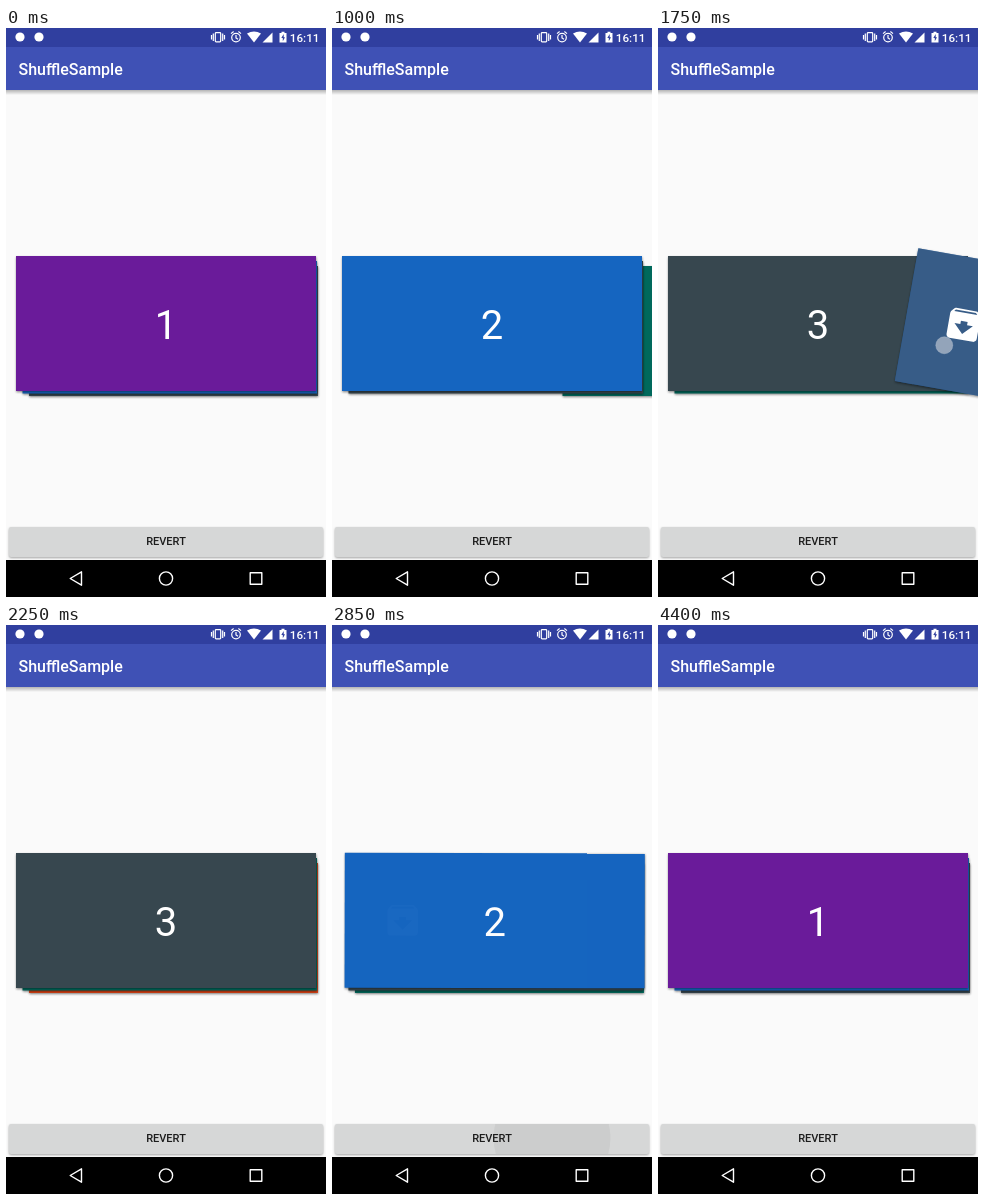
Recreate the animation shown at these times as an HTML page. Size 320x569 px, loop 4550 ms.

```html
<!DOCTYPE html>
<html lang="en">
<head>
<meta charset="utf-8">
<title>Card shuffle</title>
<style>
  html, body { margin: 0; width: 100%; height: 100%; overflow: hidden; background: #fafafa; }
  svg { display: block; width: 100%; height: 100%; }
  text { font-family: Roboto, "Open Sans", sans-serif; fill: #fff; }
  .medium { font-weight: 500; }
</style>
</head>
<body>
<svg viewBox="0 0 320 569" xmlns="http://www.w3.org/2000/svg">
  <defs>
    <linearGradient id="barShadow" x2="0" y2="1">
      <stop stop-color="#000" stop-opacity=".28"/>
      <stop offset="1" stop-color="#000" stop-opacity="0"/>
    </linearGradient>
    <filter id="soft" x="-5%" y="-10%" width="110%" height="120%">
      <feGaussianBlur stdDeviation="1.1"/>
    </filter>
    <clipPath id="buttonClip"><rect x="3" y="499" width="314" height="30" rx="2"/></clipPath>
  </defs>

  <rect width="320" height="569" fill="#fafafa"/>
  <g id="cards"></g>

  <rect y="62" width="320" height="5" fill="url(#barShadow)"/>
  <rect width="320" height="62" fill="#3f51b5"/>
  <rect width="320" height="19" fill="#303f9f"/>
  <text class="medium" x="12.5" y="46.5" font-size="16">ShuffleSample</text>

  <g fill="#fff">
    <circle cx="14" cy="9" r="4.6"/>
    <circle cx="33" cy="9" r="4.6"/>
    <path d="M241 5.5Q248 1.5 255 5.5L248 14.5Z"/>
    <path d="M256.500 14.500H266.500V4.500Z"/>
    <path d="M273.500 5H275.500V3.700H278.500V5H280.500V14.500H273.500Z"/>
    <path d="M277.700 6L275.300 10H276.800V13.300L279 9.200H277.700Z" fill="#303f9f"/>
  </g>
  <g fill="none" stroke="#fff" stroke-width="1.2">
    <rect x="209.300" y="4.600" width="5.400" height="9.200" rx=".8"/>
    <path d="M207.300 5.500V13M216.700 5.500V13M205.500 7V11.500M218.500 7V11.500"/>
    <circle cx="230" cy="9.600" r="4.300"/>
    <path d="M230 7V10L232 11.200M225 5.600L227.600 3.500M235 5.600L232.400 3.500"/>
  </g>
  <text class="medium" x="313.500" y="13.800" font-size="11.700" text-anchor="end">16:11</text>

  <rect x="3" y="500" width="314" height="30" rx="2" fill="#000" opacity=".35" filter="url(#soft)"/>
  <rect x="3" y="499" width="314" height="30" rx="2" fill="#d6d7d7"/>
  <g clip-path="url(#buttonClip)"><circle id="ripple" cx="220" cy="513"/></g>
  <text class="medium" x="160" y="517.200" font-size="11" text-anchor="middle" style="fill:#1c1c1c">REVERT</text>

  <rect y="532" width="320" height="37"/>
  <g fill="none" stroke="#fff" stroke-width="1.400" stroke-linejoin="round">
    <path d="M75.500 543.800V557.200L64.200 550.500Z"/>
    <circle cx="160" cy="550.500" r="6.600"/>
    <rect x="244.200" y="544.700" width="11.600" height="11.600"/>
  </g>
  <circle id="pointer" r="8.500" fill="#d0d4dc" stroke="#fff" stroke-opacity=".4"/>
</svg>

<script>
const LOOP = 4550;
const COLORS = ['#6a1b9a', '#1565c0', '#37474f', '#00695c', '#d84315'];
const EXIT = 340;         // distance that takes a card off stage
const SHIFT = 200;        // drag distance after which the stack has moved up
const SWIPES = [          // one per card that leaves and comes back
  { start: 350, end: 850, back: 3640, tap: 3550, settled: 4400 },
  { start: 1500, end: 1900, back: 2568, tap: 2450, settled: 3400 }
];
const ENTRIES = { 3: [890, 3640], 4: [1940, 2568] };  // card: [enters, removed]
const MOVE = 300;
const ARCHIVE = 'M20.54 5.23l-1.39-1.68C18.88 3.21 18.47 3 18 3H6c-.47 0-.88.21-1.16.55L3.46 5.23' +
  'C3.17 5.57 3 6.02 3 6.5V19c0 1.1.9 2 2 2h14c1.1 0 2-.9 2-2V6.5c0-.48-.17-.93-.46-1.27z' +
  'M12 17.5L6.5 12H10v-2h4v2h3.5zM5.12 5l.81-1h12l.94 1z';

const $ = id => document.getElementById(id);
const clamp = v => Math.min(1, Math.max(0, v));
const ease = (t, from, to) => (1 - Math.cos(Math.PI * clamp((t - from) / (to - from)))) / 2;
const set = (el, attrs) => { for (const k in attrs) el.setAttribute(k, attrs[k]); };

const box = 'x="-150" y="-67.5" width="300" height="135"';
$('cards').innerHTML = COLORS.map((color, i) => `
  <g>
    <rect ${box} transform="translate(.3 1.2)" opacity=".45" filter="url(#soft)"/>
    <rect ${box} fill="${color}"/>
    <text y="15.500" font-size="40" text-anchor="middle">${i + 1}</text>
    <g class="overlay">
      <rect ${box} fill="#555" fill-opacity=".53"/>
      <path d="${ARCHIVE}" fill="#fff" fill-rule="evenodd" transform="translate(-92 0) scale(1.7) translate(-12 -12)"/>
    </g>
  </g>`).reverse().join('');
const cards = [...$('cards').children].reverse();

function drawCard(el, i, t, offsets, shift) {
  const [enter, removed] = ENTRIES[i] || [0, LOOP];
  const away = offsets[i] || 0;
  const visible = t >= enter && t < removed && away < EXIT;
  set(el, { visibility: visible ? 'visible' : 'hidden' });
  if (!visible) return;
  const level = Math.max(0, i - shift);
  const slide = enter ? 297 * (1 - ease(t, enter, enter + MOVE)) : 0;
  const dy = away && t < SWIPES[i].back ? away * .073 : 0;
  const x = 160 + 3.75 * level + away + slide;
  const y = 295.5 + 3.75 * level + dy;
  set(el, { transform: `translate(${x} ${y}) rotate(${away * .0425}) scale(${1 - .0185 * level})` });
  set(el.querySelector('.overlay'), { opacity: clamp(away / 160) });
}

function drawTouch(t, offsets) {
  const pointer = { opacity: 0 }, ripple = { opacity: 0 };
  SWIPES.forEach(({ start, end, tap, settled }, i) => {
    const dx = offsets[i];
    if (t >= start && t < end && dx < EXIT * .74)
      Object.assign(pointer, { cx: 50 + dx, cy: 300 + dx * .073, opacity: .6 });
    if (t >= tap && t < settled) {
      const u = (t - tap) / (settled - tap);
      Object.assign(ripple, { r: 12 + 110 * u, opacity: .08 * (1 - u) });
      if (t < tap + 230) Object.assign(pointer, { cx: 222, cy: 513, opacity: .3 });
    }
  });
  set($('pointer'), pointer);
  set($('ripple'), ripple);
}

function render(t) {
  const offsets = SWIPES.map(s => EXIT * (ease(t, s.start, s.end) - ease(t, s.back, s.back + MOVE)));
  const shift = offsets.reduce((sum, dx) => sum + clamp(dx / SHIFT), 0);
  cards.forEach((el, i) => drawCard(el, i, t, offsets, shift));
  drawTouch(t, offsets);
}

const origin = performance.now();
function tick() {
  render((performance.now() - origin) % LOOP);
  requestAnimationFrame(tick);
}
tick();
</script>
</body>
</html>
```
